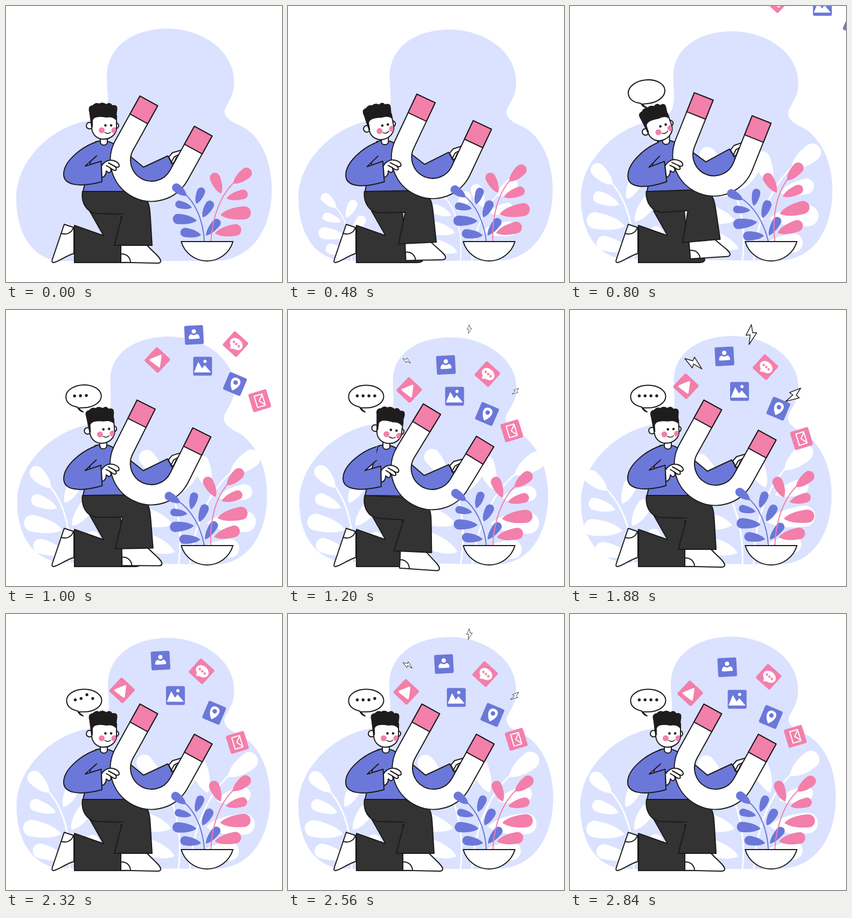
An HTML page that plays this animation: 512x512 px, repeating every 2880 ms.

```html
<!DOCTYPE html>
<html lang="en">
<head>
<meta charset="utf-8">
<title>Magnet</title>
<style>
  html, body { margin: 0; width: 100%; height: 100%; overflow: hidden; background: #fff; }
  svg { display: block; width: 100vw; height: 100vh; }
  .ln { stroke: #1c1a1b; stroke-width: 2; stroke-linejoin: round; stroke-linecap: round; }
  .w { fill: #fff; } .b { fill: #6b78d9; } .p { fill: #f37fab; } .d { fill: #333; } .k { fill: #1f1c1d; }
  .no { fill: none; }
  .line { fill: none; stroke: #fff; stroke-width: 2; stroke-linejoin: round; }
</style>
</head>
<body>
<svg viewBox="0 0 512 512">
  <path id="blob" fill="#dae2ff"/>
  <g id="back"></g>

  <g class="ln">
    <path class="w" d="M108 405L126 411V459C110 464 98 474 88 476Q84 476 86 470Z"/>
    <path class="no" d="M103 422C112 425 122 421 125 411"/>
    <path class="d" d="M155 380L181 426L127 407V476H240Q250 476 250 470L222 440L214 402L212 380Z"/>
    <g id="leg">
      <path class="w" d="M213 442H260C272 456 287 466 287 473Q287 477 281 477L213 475.500Z"/>
      <path class="no" d="M213 460C224 459 231 467 231 476"/>
      <path class="d" d="M142 344H235L262 362C268 372 267 384 271 444H201L216 386L168 385C149 383 139 364 142 344Z"/>
    </g>
    <g id="torso">
      <path class="b" d="M166 252C175 249 190 249 200 256L212 285L222 320L226 344H143L146 330Z"/>
      <path class="w" d="M175 240V252C175 260 188 260 188 252V240Z"/>
    </g>
    <g id="armR">
      <path class="b" d="M215 262L232 280L255 299L300 278L309 294L311 302C300 343 240 343 222 310Z"/>
      <path class="w" d="M302 280L309 272L330 266L322 284L308 292Z"/>
      <path class="no" d="M306 291L312 280L320 276M312 290L316 281"/>
    </g>
    <g id="magnet">
      <path class="w" d="M-76.500-93.600V0A76.500 76.500 0 0 0 76.500 0V-93.600H39V0A39 39 0 0 1-39 0V-93.600Z"/>
      <path class="p" d="M-76.500-93.600h37.500v38h-37.500zM39-93.600h37.500v38h-37.500z"/>
    </g>
    <g id="armL">
      <path class="b" d="M168 252C140 261 107 288 107 312C107 331 132 338 178 326L176.500 288L147 297L168 278"/>
      <path class="w" d="M177 297C181 290 188 286 194 286C202 286 210 291 210 296C210 300 205 300 201 297C205 300 206 304 203 305C200 306 196 302 193 300C196 304 195 308 192 309C189 310 187 306 186 306C186 312 183 317 178 318Z"/>
      <path class="no" d="M201 297L190 291M193 300L186 296"/>
    </g>
    <g id="head">
      <circle class="w" cx="155" cy="222" r="6"/>
      <circle class="w" cx="203.500" cy="222" r="5.500"/>
      <path class="w" d="M159 203V226C160 240 170 247 181 247C193 247 205 239 205 226V203Z"/>
      <g stroke="none">
        <circle class="p" cx="177.500" cy="230.500" r="5.500"/>
        <path class="p" d="M204 226A5.500 5.500 0 1 0 202 236Q204.500 232 204 226Z"/>
        <circle class="k" cx="184.500" cy="221.500" r="2.300"/>
        <circle class="k" cx="195" cy="221.500" r="2.300"/>
        <path class="k" d="M158 225L154.500 197Q151 185 161 184Q166 178 173 181Q179 177 186 182Q193 177 197 184Q207 182 206.500 191L204 212Q198 205 186 207Q164 203 161 212V225Z"/>
      </g>
      <path class="no" d="M183 234.500Q189 238.500 194.500 234" stroke-width="1.500"/>
    </g>
  </g>

  <g id="front"></g>
  <path class="w ln" d="M325 437H421A50 50 0 0 1 325 437Z"/>

  <g id="bubble">
    <path class="w ln" d="M133 180C120 177 112.500 170 112.500 160.500C112.500 149 127 139.500 145 139.500S177.500 149 177.500 160.500S163 181.500 145 181.500H135Q138 186 143 189Q136 187 133 180Z"/>
    <g id="dots" class="k"></g>
  </g>
  <g id="icons"></g>
  <g id="bolts"></g>
</svg>
<script>
const LOOP = 2880, STEP = 40;
const $ = id => document.getElementById(id);
const set = (id, tf) => $(id).setAttribute('transform', tf);

// Smooth swing through extremes given as time, value, time, value ...
function swing(t, ...keys) {
  let [t0, v0] = keys;
  for (let i = 2; i < keys.length; i += 2) {
    const [t1, v1] = keys.slice(i, i + 2);
    const u = Math.min(1, Math.max(0, (t - t0) / (t1 - t0)));
    if (u < 1) return v0 + (v1 - v0) * u * u * (3 - 2 * u);
    [t0, v0] = [t1, v1];
  }
  return v0;
}

const lean = t => swing(t, 160, 0, 780, -1, 1220, .33, 1480, -.26, 1880, 0);
const sink = t => swing(t, 160, 0, 780, -1, 1220, .8, 1500, -.16, 1880, 0);
const nod = t => swing(t, 160, 0, 760, -1, 1200, .37, 1480, -.41, 2200, 0);
const gust = t => swing(t, 160, 0, 740, -10.2, 1460, 3, 1900, -1.3, 2840, 0);
const breeze = t => swing(t, 600, 0, 1380, 5, 1900, -3.3, 2360, 1.4, 2840, 0);

// Teardrop: round end (x, y, r), pointed end (px, py)
function drop([x, y, r, px, py]) {
  const len = Math.hypot(x - px, y - py), dx = (x - px) / len, dy = (y - py) / len;
  const pt = (along, side) =>
    (px + dx * along - dy * side).toFixed(1) + ' ' + (py + dy * along + dx * side).toFixed(1);
  return `M${pt(0, 0)}C${pt(len * .2, r * .7)} ${pt(len * .6, r)} ${pt(len, r)}` +
    `A${r} ${r} 0 0 0 ${pt(len, -r)}C${pt(len * .6, -r)} ${pt(len * .2, -r * .7)} ${pt(0, 0)}Z`;
}

// One plant, rooted at the origin, serves for all five
const leaves = [
  [52, -100, 8, 33, -85], [47, -69, 7, 23, -63], [49, -42, 9.5, 14, -39], [36, -17, 8.5, 6, -12],
  [6, -93, 7.5, 15, -70], [-10, -68, 8, 3, -45], [-23, -35, 8, -3, -11]
].map(drop);
const plants = [
  { id: 'left', x: 118, y: 473, size: 1.61, flip: -1, turn: 5, count: 7, color: '#fff' },
  { id: 'mid', x: 320, y: 473, size: 1.84, flip: -1, turn: 8.4, count: 5, color: '#fff' },
  { id: 'right', x: 341, y: 473, size: 2.03, flip: 1, turn: 0, count: 5, color: '#fff' },
  { id: 'blue', x: 368, y: 437, size: 1, flip: -1, turn: 0, count: 7, color: '#6b78d9', lag: 80 },
  { id: 'pink', x: 380, y: 437, size: 1.27, flip: 1, turn: 0, count: 5, color: '#f37fab', lag: 0 }
];
for (const p of plants) {
  p.front = 'lag' in p;
  $(p.front ? 'front' : 'back').innerHTML += `<g id="${p.id}" fill="${p.color}">` +
    `<path d="M0 0C2-37 15-71 38-90" fill="none" stroke="${p.color}" stroke-width="${(p.front ? 2 : 3) / p.size}"/>` +
    `<path d="${leaves.slice(0, p.count).join('')}"/></g>`;
}

const row = (n, f) => Array.from({ length: n }, (_, i) => f(i)).join('');
$('dots').innerHTML = row(4, i => `<circle cx="${128.5 + i * 10.8}" r="2.700"/>`);

const icons = [
  { x: 293, y: 102, dx: -6.5, dy: -16, turn: -3, c: 'b', art: '<circle cy="-6.500" r="4"/><path d="M-10 7C-11 1-6-3-4-1Q0 2 4-1C6-3 11 1 10 7Q0 8-10 7Z"/>' },
  { x: 225, y: 148.5, dx: -10, dy: -7, turn: 43, c: 'p', art: '<path stroke="#fff" stroke-width="3.500" stroke-linejoin="round" d="M-9.500 8.500L-1-10L10.500 6.500Z"/>' },
  { x: 309, y: 160, dx: 5.5, dy: -9, turn: 0, c: 'b', art: '<path d="M-16 11.500L-8-8L-1 4L4-2L15.500 11.500Z"/><circle cx="4.500" cy="-9" r="3"/>' },
  { x: 370, y: 119, dx: -7.5, dy: -13, turn: 42, c: 'p', art: '<ellipse cx="1" cy="-1" rx="13" ry="10"/><path d="M-5 6Q-4 11-2 13L6 7Z"/><g class="p">' + row(3, i => `<circle cx="${i * 6 - 5}" cy="-1" r="2.200"/>`) + '</g>' },
  { x: 369, y: 193, dx: 17.5, dy: -10, turn: 23, c: 'b', art: '<path d="M0 13C-11 3-12-12 0-12S11 3 0 13Z"/><circle class="b" cy="-3" r="4.200"/>' },
  { x: 415, y: 224, dx: 14.5, dy: 14.5, turn: -17, c: 'p', art: '<path class="line" d="M-7.500-11H7.500V11H-7.500ZM7.500-10L-1 0L7.500 10"/>' }
];
$('icons').innerHTML = row(icons.length, i =>
  `<g id="icon${i}"><rect class="${icons[i].c}" x="-17.500" y="-17.500" width="35" height="35" rx="3"/><g fill="#fff">${icons[i].art}</g></g>`);

// Each bolt grows from its outer tip
const bolts = [{ x: 336.5, y: 27, turn: 0 }, { x: 213, y: 90, turn: -65 }, { x: 428, y: 145, turn: 42 }];
$('bolts').innerHTML = row(bolts.length, i =>
  `<path id="bolt${i}" class="w" stroke="#1c1a1b" stroke-width="1.500" stroke-linejoin="round" d="M0 0L-10.500 21L-2.500 20L-4.500 39L10.500 16L2.500 16Z"/>`);

const wide = 'M300 42C230 42 187 80 187 130C187 160 196 188 178 202C170 210 160 211 150 213C80 226 19 290 19 355C19 430 55 473 105 473L385 473C455 473 493 415 493 340C493 280 467 236 435 222C415 214 398 203 409 185C418 170 423 160 423 140C423 80 360 42 300 42Z';
const tight = 'M303 51C235 51 195 85 195 130C195 160 200 188 184 202C174 209 163 211 153 213C82 226 21 290 21 355C21 420 52 460 100 467L385 472C448 472 482 415 482 345C482 285 457 245 428 228C412 219 396 208 408 190C418 173 424 162 424 145C424 90 365 51 303 51Z';
function morph(m) {
  const ends = tight.match(/\d+/g);
  return wide.replace(/\d+/g, a => (+a + (ends.shift() - a) * m).toFixed(2));
}

function draw(t) {
  $('blob').setAttribute('d', morph(swing(t, 160, 0, 1340, 1, 2840, 0)));

  const grow = swing(t, 200, 0, 640, 1);
  for (const { id, x, y, size, flip, turn, front, lag } of plants) {
    const s = front ? size : size * grow;
    const bend = turn + (front ? gust(t - lag) : breeze(t));
    set(id, `translate(${x} ${y}) rotate(${bend}) scale(${s * flip} ${s})`);
  }

  const l = lean(t), s = sink(t), n = nod(t), pull = Math.max(0, s);
  const mx = -3 * Math.abs(s), my = 10 * s;
  set('magnet', `translate(${270 + mx} ${286 + my}) rotate(${29 + 7.3 * l})`);
  set('armR', `translate(${mx} ${my}) rotate(${3.65 * l} 255 299)`);
  set('armL', `translate(${-6 * pull} ${2 * pull}) rotate(${4 * l} 178 307)`);
  set('leg', `rotate(${2.45 * (l + s)} 142 350)`);
  set('torso', `rotate(${2 * l} 143 345)`);
  set('head', `translate(${16 * n} ${3 * n * n}) rotate(${20 * n} 181 225)`);

  const pop = swing(t, 440, 0, 760, 1.05, 1100, 1), tilt = swing(t, 760, -6, 1160, 0);
  set('bubble', `translate(143 189) rotate(${tilt}) scale(${pop}) translate(-143 -189)`);
  [...$('dots').children].forEach((dot, i) => {
    const peak = 2080 + i * 120;
    dot.setAttribute('cy', 159.2 - swing(t, peak - 180, 0, peak, 9.5, peak + 180, 0));
    dot.setAttribute('opacity', t >= 880 + i * 60 ? 1 : 0);
  });

  const fly = swing(t, 600, 215, 1200, 0);
  const drift = swing(t, 1160, 0, 1900, 1, 2260, 1, 2840, .2);
  $('icons').style.display = t < 700 ? 'none' : '';
  icons.forEach(({ x, y, dx, dy, turn }, i) =>
    set('icon' + i, `translate(${x + dx * drift + fly} ${y + dy * drift - fly}) rotate(${turn})`));

  const beat = (t - 1160) % 590;
  const flash = t > 1160 && beat < 270 ? Math.sin(Math.PI * beat / 270) : 0;
  $('bolts').style.display = flash ? '' : 'none';
  bolts.forEach(({ x, y, turn }, i) =>
    set('bolt' + i, `translate(${x} ${y}) rotate(${turn}) scale(${flash * .95})`));
}

const start = performance.now();
function tick() {
  const t = Math.max(0, performance.now() - start) % LOOP;
  draw(Math.floor(t / STEP) * STEP);
  requestAnimationFrame(tick);
}
tick();
</script>
</body>
</html>
```
